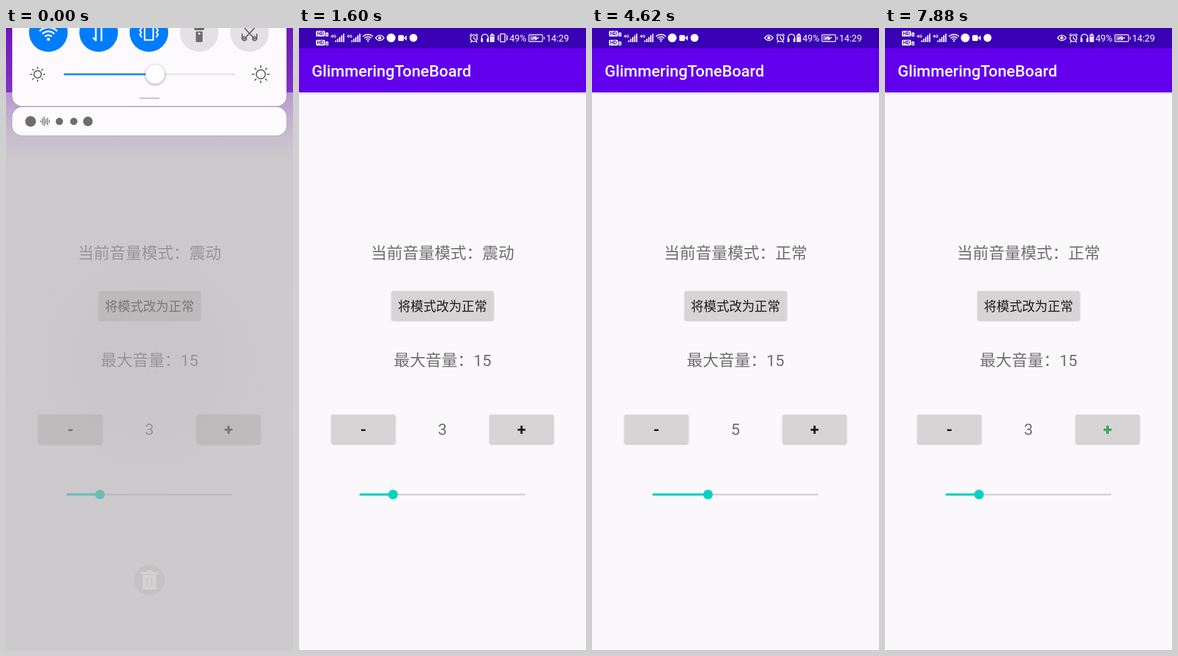
An HTML page with a canvas that plays this animation: 508x1102 px, repeating every 8000 ms.

```html
<!DOCTYPE html>
<html lang="zh-CN">
<head>
<meta charset="utf-8">
<title>Volume mode demo</title>
<style>
html, body { margin: 0; width: 100%; height: 100%; overflow: hidden; background: #faf8fa; }
canvas { display: block; width: 508px; height: 1102px; }
</style>
</head>
<body>
<canvas id="stage" width="508" height="1102"></canvas>
<script>
const W = 508, H = 1102, LOOP = 8000, STEP = 1000 / 15;
const ctx = document.getElementById('stage').getContext('2d');
const FONT = 'Roboto, "Noto Sans CJK SC", "Noto Sans CJK", sans-serif';
const APP = 'GlimmeringToneBoard';
const TEAL = '#08d2c0', BLUE = '#007dfe', GREY = '#6f6c70';

const clamp = x => Math.max(0, Math.min(1, x));
const ramp = (t, a, b) => clamp((t - a) / (b - a));
const ease = x => 1 - (1 - x) ** 3;
const between = (t, a, b) => t >= a && t < b;
const pulse = (t, a, b) => Math.sin(Math.PI * ramp(t, a, b));

function text(s, x, y, size, color, weight = 400, align = 'left') {
  ctx.font = `${weight} ${size}px ${FONT}`;
  ctx.textAlign = align;
  ctx.fillStyle = color;
  ctx.fillText(s, x, y);
}

function rect(x, y, w, h, color) {
  ctx.fillStyle = color;
  ctx.fillRect(x, y, w, h);
}

function round(x, y, w, h, r, color) {
  ctx.beginPath();
  ctx.roundRect(x, y, w, h, r);
  ctx.fillStyle = color;
  ctx.fill();
}

function dot(x, y, r, color) {
  ctx.beginPath();
  ctx.arc(x, y, r, 0, Math.PI * 2);
  ctx.fillStyle = color;
  ctx.fill();
}

function ring(x, y, r, color, width, from = 0, to = Math.PI * 2) {
  ctx.beginPath();
  ctx.arc(x, y, r, from, to);
  ctx.strokeStyle = color;
  ctx.lineWidth = width;
  ctx.stroke();
}

// Strokes SVG path data placed at x, y.
function line(d, x, y, color, width) {
  ctx.save();
  ctx.translate(x, y);
  ctx.strokeStyle = color;
  ctx.lineWidth = width;
  ctx.lineCap = ctx.lineJoin = 'round';
  ctx.stroke(new Path2D(d));
  ctx.restore();
}

function withShadow(blur, dy, color, draw) {
  ctx.save();
  ctx.shadowBlur = blur;
  ctx.shadowOffsetY = dy;
  ctx.shadowColor = color;
  draw();
  ctx.restore();
}

function fade(y0, y1, from, to) {
  const g = ctx.createLinearGradient(0, y0, 0, y1);
  g.addColorStop(0, from);
  g.addColorStop(1, to);
  return g;
}

function wifi(x, y, r, color, width) {
  const a = -Math.PI * 0.75, b = -Math.PI * 0.25;
  for (const k of [1, 0.68, 0.38]) ring(x, y, r * k, color, width, a, b);
  dot(x, y - 1, width * 0.9, color);
}

function vibrate(x, y, k, color, width) {
  ctx.save();
  ctx.translate(x, y);
  ctx.scale(k, k);
  line('M-4 -7H4V7H-4ZM-7 -4L-8.5 -2L-7 0L-8.5 2L-7 4M7 -4L8.5 -2L7 0L8.5 2L7 4', 0, 0, color, width / k);
  ctx.restore();
}

function sun(x, y, r, reach, color) {
  ring(x, y, r, color, 2);
  for (let i = 0; i < 8; i++) {
    const c = Math.cos(i * Math.PI / 4), s = Math.sin(i * Math.PI / 4);
    line(`M${c * (r + 4)} ${s * (r + 4)}L${c * reach} ${s * reach}`, x, y, color, 2);
  }
}

function eye(x) {
  line('M-7.5 0Q0 -9.5 7.5 0Q0 9.5 -7.5 0', x, 17.5, '#fff', 1.7);
  dot(x, 17.5, 2.7, '#fff');
}

function alarm(x) {
  ring(x, 18, 6, '#fff', 1.7);
  line('M0 -3V1L3 2M-7 -5L-4 -7.5M7 -5L4 -7.5M-4 5.5L-5.5 7.5M4 5.5L5.5 7.5', x, 18, '#fff', 1.5);
}

function headset(x) {
  line('M-6 4V0A6 6 0 0 1 6 0V4', x, 17, '#fff', 1.6);
  round(x - 7, 18, 3.5, 7, 1.5, '#fff');
  round(x + 3.5, 18, 3.5, 7, 1.5, '#fff');
  rect(x + 11, 10, 4, 2, '#fff');
  round(x + 9, 12, 8, 13, 1, '#e4def6');
  rect(x + 10, 14, 6, 1, '#3700b3');
}

function camera(x) {
  round(x - 7.5, 12.5, 10, 10.5, 2, '#fff');
  ctx.beginPath();
  ctx.moveTo(x + 2.5, 17.5);
  ctx.lineTo(x + 7.5, 13);
  ctx.lineTo(x + 7.5, 22.5);
  ctx.fill();
}

function statusIcons(vibrating) {
  for (const i of [0, 1]) {
    const y = 5 + i * 16;
    round(30, y, 16, 10, 2, '#fff');
    text('HD', 38, y + 8.3, 9, '#3700b3', 700, 'center');
    round(47, y + 3, 5, 7, 1, '#fff');
    text(i + 1, 49.5, y + 9, 6, '#3700b3', 700, 'center');
    const x = 56 + i * 28.5;
    text('4G', x, 17, 8, '#fff', 700);
    for (let b = 0; b < 5; b++) rect(x + 8 + b * 3.5, 22 - b * 3, 2.2, 3 + b * 3, '#fff');
  }
  wifi(122, 24, 12.5, '#fff', 1.8);
  const left = vibrating ? 163 : 142;
  dot(left, 17.5, 7.8, '#fff');
  camera(left + 20);
  dot(left + 39.5, 17.5, 7, '#fff');
  eye(vibrating ? 143 : 313);
  const shift = vibrating ? 0 : 24;
  alarm(309.5 + shift);
  headset(329 + shift);
  if (vibrating) vibrate(360.5, 17.5, 1, '#fff', 1.7);
  text('49%', 372.5, 24, 16.2, '#fff');
  line('M1 0H23Q24 0 24 1V11Q24 12 23 12H1Q0 12 0 11V1Q0 0 1 0M27 4V8', 407, 12, '#fff', 1.4);
  round(409, 14, 12, 8, 1, '#8d78d6');
  line('M-5 1L1 -2V2L6 -1', 418, 18, '#fff', 1.8);
  text('14:29', 437.5, 24, 16.2, '#fff');
}

function button(x, y, w, press) {
  const shade = 214 - press * 8;
  withShadow(3, 1.2, 'rgba(0,0,0,.24)', () =>
    round(x, y, w, 51.5, 3, `rgb(${shade},${shade - 2},${shade - 1})`));
}

function sign(s, x, tinted) {
  text(s, x, 720.5, 28.2, tinted ? '#3d3560' : '#1c1b1d', 700, 'center');
  if (tinted) text(s, x, 720.5, 28.2, '#22cc3c', 400, 'center');
}

function drawPage(t, volume, vibrating) {
  rect(0, 0, W, H, '#faf8fa');
  withShadow(4, 1, 'rgba(0,0,0,.22)', () => rect(0, 35, W, 79, '#6200ee'));
  rect(0, 0, W, 36, '#3a00b3');
  ctx.globalAlpha = ramp(t, 190, 470);
  statusIcons(vibrating);
  ctx.globalAlpha = 1;
  text(APP, 22.5, 85.5, 28.2, '#fff', 500);

  const gray = '#706e70';
  text('当前音量模式：' + (vibrating ? '震动' : '正常'), 254, 409, 28.2, gray, 400, 'center');
  text('最大音量：15', 254, 599, 28.2, gray, 400, 'center');
  text(volume, 254, 721, 28.2, gray, 400, 'center');

  button(164, 466, 180.5, pulse(t, 1860, 2400));
  text('将模式改为正常', 254, 501, 22.57, '#1c1b1d', 500, 'center');
  button(57.5, 685, 113, pulse(t, 5650, 6220) + pulse(t, 6260, 6700));
  sign('-', 114, between(t, 5690, 6900));
  button(337.5, 685, 113, pulse(t, 3130, 3480) + pulse(t, 3600, 3940));
  sign('+', 394, t >= 5690);

  const knob = 108 + 292 * volume / 15;
  round(107, 825, 294, 3.2, 1.5, '#d6d4d6');
  round(107, 824.6, knob - 107, 3.8, 1.5, TEAL);
  dot(knob, 826.5, 8.6, TEAL);
}

function drawToast(alpha) {
  if (!alpha) return;
  ctx.globalAlpha = alpha;
  round(34, 936, 440, 75.5, 25, '#dad8d9');
  text(APP + '将震动修改为响铃,手', 56.5, 969, 19.75, '#141314');
  text('动调节音量可恢复震动.', 56.5, 995, 19.75, '#141314');
  ctx.globalAlpha = 1;
}

function gear(x, y) {
  ctx.beginPath();
  for (let i = 0; i < 96; i++) {
    const a = i / 96 * Math.PI * 2;
    const r = 12.2 + Math.tanh(2 * Math.cos(8 * a));
    ctx.lineTo(x + r * Math.cos(a), y + r * Math.sin(a));
  }
  ctx.closePath();
  ctx.strokeStyle = '#5f5d61';
  ctx.lineWidth = 2;
  ctx.stroke();
  ring(x, y, 4.8, '#5f5d61', 2);
}

function drawVolumePanel(shown, volume) {
  if (!shown) return;
  ctx.save();
  ctx.translate(78 * (1 - shown), 0);
  withShadow(6, 1.5, 'rgba(0,0,0,.28)', () => round(434, 240, 62.5, 371, 31, '#f8f6f8'));
  const y = 474 - 208 * volume / 15;
  round(462.5, 266, 5, 208, 2.5, '#dddbdd');
  round(462.8, y, 4.4, 474 - y, 2.2, '#0b78ee');
  withShadow(3, 1, 'rgba(0,0,0,.35)', () => dot(465, y, 10.8, '#fff'));
  dot(465, 517, 11, '#0b78ee');
  rect(444, 547.5, 42, 1, '#d3d1d3');
  gear(465, 580);
  ctx.restore();
}

function drawBin() {
  dot(254, 978, 27, '#c3c1c2');
  round(242, 969, 24, 26, 3, '#d4d2d3');
  rect(239, 964, 30, 4, '#d4d2d3');
  rect(249, 961, 10, 4, '#d4d2d3');
  line('M-4 -4V9M4 -4V9', 254, 979, '#c3c1c2', 2);
}

function drawDim(amount, binAlpha) {
  if (!amount) return;
  ctx.globalAlpha = amount;
  rect(0, 0, W, H, 'rgba(176,174,175,.61)');
  const glow = ctx.createRadialGradient(254, 590, 60, 254, 590, 290);
  glow.addColorStop(0, 'rgba(150,148,149,.08)');
  glow.addColorStop(1, 'rgba(150,148,149,0)');
  rect(0, 300, W, 580, glow);
  rect(0, 0, W, 114, fade(0, 114, '#6c17bd', '#8232ca'));
  rect(0, 114, W, 136, fade(114, 250, '#b795d2', 'rgba(200,190,205,0)'));
  ctx.globalAlpha = binAlpha;
  drawBin();
  ctx.globalAlpha = 1;
}

function drawShade(offset) {
  ctx.save();
  ctx.translate(0, offset);
  withShadow(2, 0, 'rgba(0,0,0,.3)', () => {
    round(11, -60, 485.5, 198.5, 18, '#fdfafe');
    round(11, 140, 485.5, 50.5, 18, '#fdfbfe');
  });
  for (let i = 0; i < 5; i++) dot(75 + 89 * i, 8, 34.2, i < 3 ? BLUE : '#e4e0e5');
  wifi(75, 21, 22, '#fff', 3);
  line('M-5 14V-16M-5 14L-9 10M5 -16V14M5 -16L9 -12', 164, 8, '#fff', 3);
  vibrate(253, 8, 1.9, '#fff', 2.6);
  round(336, 6, 12, 19, 2, GREY);
  round(333, -12, 18, 16, 3, GREY);
  dot(342, 10, 2, '#e4e0e5');
  line('M-8 -8L7 8M8 -8L-7 8M-13 2V10H-7M13 2V10H7', 431, 9, GREY, 2.4);
  ring(422, 19, 3.5, GREY, 2.2);
  ring(440, 19, 3.5, GREY, 2.2);

  sun(56, 82, 6.5, 12.5, '#605d61');
  sun(451, 82, 8, 15, '#605d61');
  round(102, 80.5, 304, 3, 1.5, '#e6e2e7');
  round(102, 80.5, 162, 3, 1.5, '#0b80ee');
  withShadow(4, 1, 'rgba(0,0,0,.45)', () => dot(264, 82, 17, '#fff'));
  round(236, 123, 36, 3, 1.5, '#cfccd0');

  dot(43.5, 165.5, 9.5, GREY);
  [3, 11, 17, 9, 13, 4].forEach((h, i) => rect(60.5 + i * 3.1, 165.5 - h / 2, 1.6, h, GREY));
  dot(94.5, 165.5, 6.5, GREY);
  dot(120, 165.5, 6.5, GREY);
  dot(145, 165.5, 8.5, GREY);
  ctx.restore();
}

function volumeAt(t) {
  if (t < 3190) return 3;
  if (t < 3660) return 4;
  if (t < 5720) return 5;
  return t < 6320 ? 4 : 3;
}

function draw(t) {
  const volume = volumeAt(t);
  drawPage(t, volume, t < 1930);
  drawToast(ramp(t, 1960, 2400) * (1 - ramp(t, 4466, 4600)));
  const first = ease(ramp(t, 3180, 3460)) * (1 - ramp(t, 3960, 4260));
  const second = ease(ramp(t, 5680, 5980)) * (1 - ramp(t, 6500, 6800));
  drawVolumePanel(first + second, volume);
  drawDim(t < 70 ? 1 - t / 140 : 0.09 * ramp(t, 320, 130), 1 - ramp(t, 0, 130));
  if (t < 230) drawShade(-139 * t / (2 * STEP));
}

function tick(now) {
  const t = now % LOOP;
  draw(Math.floor((t + 4) / STEP) * STEP % LOOP);
  requestAnimationFrame(tick);
}
requestAnimationFrame(tick);
</script>
</body>
</html>
```
